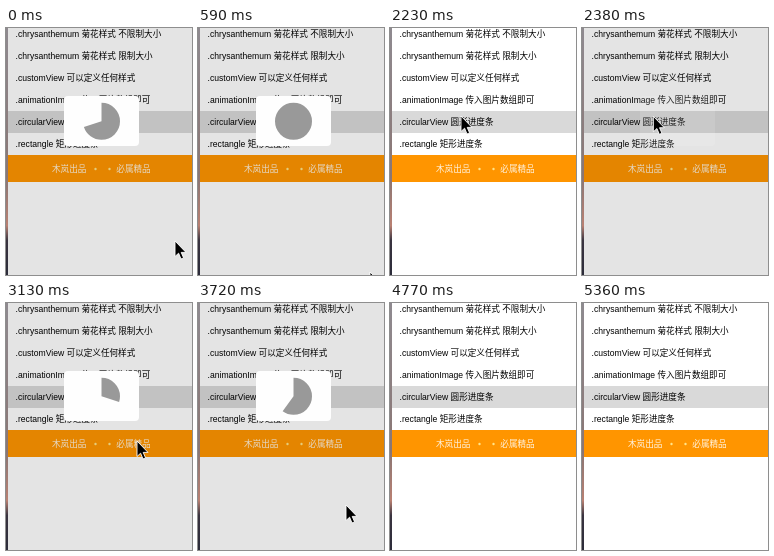
An HTML page that plays this animation: 186x247 px, repeating every 5.46 s.

```html
<!DOCTYPE html>
<html lang="zh-CN">
<head>
<meta charset="utf-8">
<title>HUD demo</title>
<style>
  html, body { margin: 0; height: 100%; overflow: hidden; background: #fff; }
  svg { display: block; width: 100vw; height: 100vh; }
  text { font: 8.6px "Liberation Sans", "Noto Sans CJK SC", "Noto Sans CJK", sans-serif; white-space: pre; }
</style>
</head>
<body>
<svg viewBox="0 0 186 247">
  <defs>
    <linearGradient id="edge" x1="0" y1="0" x2="0" y2="1">
      <stop offset="0" stop-color="#8f8a90"/>
      <stop offset=".6" stop-color="#8a7674"/>
      <stop offset=".8" stop-color="#b98072"/>
      <stop offset=".86" stop-color="#3a3440"/>
      <stop offset="1" stop-color="#2c2c3a"/>
    </linearGradient>
  </defs>
  <rect width="186" height="247" fill="#fff"/>
  <rect x="2" y="83" width="184" height="22" fill="#d9d9d9"/>
  <g id="rows"></g>
  <rect x="2" y="127" width="184" height="27" fill="#ff9500"/>
  <g fill="#fff4e2">
    <text x="46" y="144.3">木岚出品</text>
    <text x="110.3" y="144.3">必属精品</text>
  </g>
  <g fill="#ffe48a">
    <circle cx="89.5" cy="141" r="1.2"/>
    <circle cx="103.5" cy="141" r="1.2"/>
  </g>
  <rect id="dim" x="2" width="184" height="247" opacity=".106"/>
  <rect width="2" height="247" fill="url(#edge)"/>
  <g id="hud">
    <rect x="58" y="68" width="75" height="50" rx="4" fill="#fefefe"/>
    <circle id="pie" cx="95.5" cy="93.3" r="9.25" pathLength="10" fill="none"
      stroke="#999" stroke-width="18.5" transform="rotate(-90 95.5 93.3)"/>
  </g>
  <path id="cursor" d="M0 0V15.5L3.6 12.2 6 18 8.6 16.9 6.2 11.4H11Z" stroke="#fff" stroke-width=".9"/>
</svg>
<script>
const LOOP = 5460, TICK = 149;
const $ = id => document.getElementById(id);

$('rows').innerHTML = [
  '.chrysanthemum 菊花样式 不限制大小',
  '.chrysanthemum 菊花样式 限制大小',
  '.customView 可以定义任何样式',
  '.animationImage 传入图片数组即可',
  '.circularView 圆形进度条',
  '.rectangle 矩形进度条'
].map((s, i) => `<text x="9.6" y="${9.2 + 22 * i}">${s}</text>`).join('');

// Pointer path: tick, x, y
const path = [
  [0, 169, 213], [2, 170, 222], [5, 173, 255], [9, 140, 255], [12, 105, 180],
  [15, 71, 88], [18, 72, 89], [21, 131, 138], [25, 148, 202], [30, 152, 255], [37, 152, 255]
];

function pointer(k) {
  const i = path.findIndex(p => p[0] > k);
  const [a, ax, ay] = path[i - 1], [b, bx, by] = path[i];
  const u = (k - a) / (b - a);
  return [ax + (bx - ax) * u, ay + (by - ay) * u];
}

function draw(ms) {
  const k = Math.floor((ms + 5) / TICK), t = k * TICK;
  const shown = k < 5 || (k >= 16 && k < 32);
  const start = k < 5 ? -1530 : 2470;
  const tenths = Math.max(0, Math.min(10, Math.floor((t - start) / 200)));
  const fade = k < 5 ? 1 : Math.min(1, .12 + (k - 16) * .5);

  $('dim').style.display = $('hud').style.display = shown ? '' : 'none';
  $('hud').setAttribute('opacity', Math.max(0, fade));
  $('pie').setAttribute('stroke-dasharray', tenths < 10 ? `${tenths} 10` : 'none');
  $('cursor').setAttribute('transform', `translate(${pointer(k)})`);
}

function frame() {
  draw(performance.now() % LOOP);
  requestAnimationFrame(frame);
}
frame();
</script>
</body>
</html>
```
